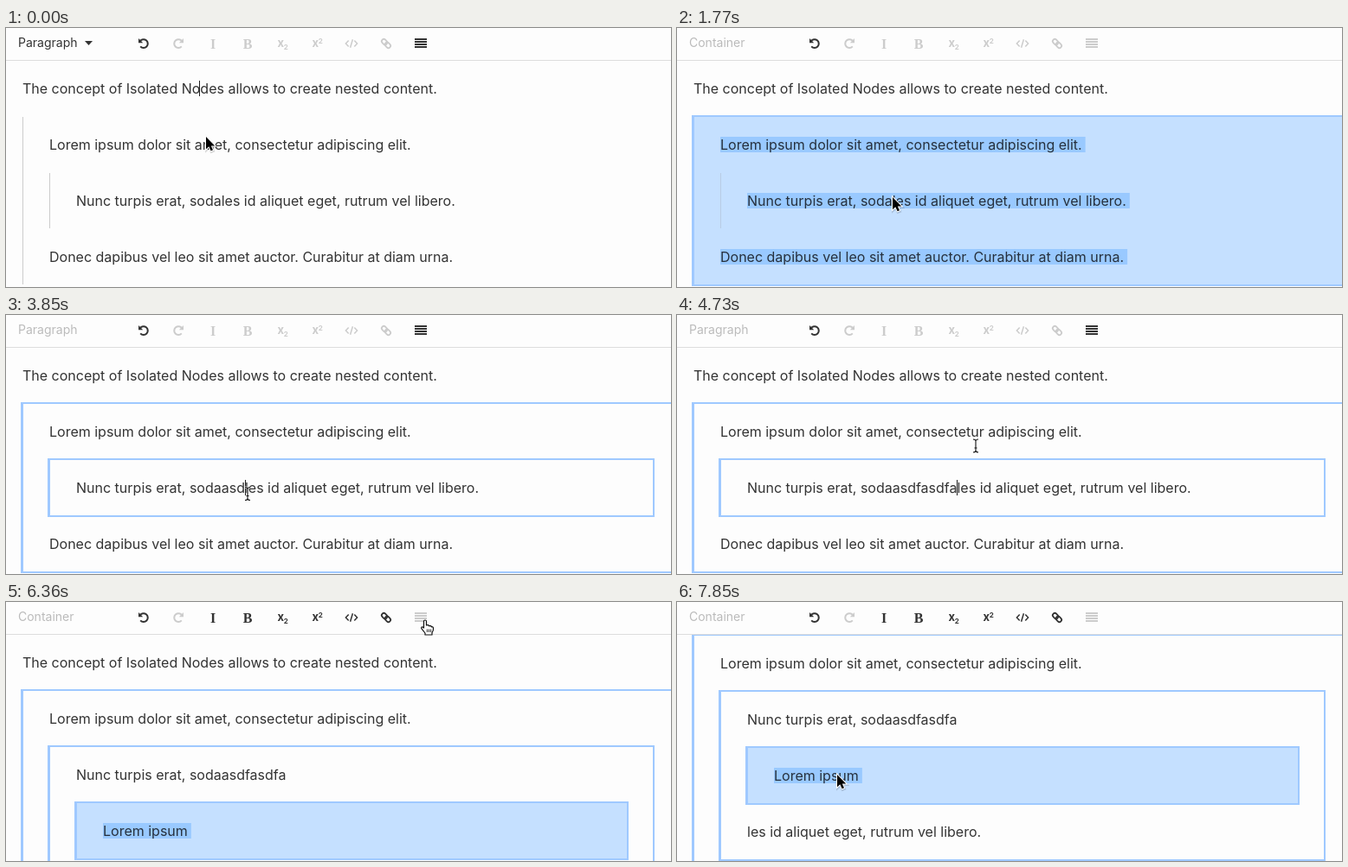
These frames come from a looping animation (768x300 px, 8000 ms). An HTML page:

```html
<!DOCTYPE html>
<html lang="en">
<head>
<meta charset="utf-8">
<title>Nested content editor</title>
<style>
  html, body { margin: 0; width: 100%; height: 100%; overflow: hidden; background: #fdfdfd; }
  svg { display: block; }
  text { font-family: Inter, sans-serif; white-space: pre; }
  .serif { font: bold 16px "Liberation Serif", serif; }
</style>
</head>
<body>
<svg id="stage" width="768" height="300" viewBox="0 0 768 300"></svg>
<script>
const LOOP = 8000, TICK = 148.1;
const INK = '#333', DIM = '#ccc', EDGE = '#9fc9ff', FILL = '#c5e0ff', MARK = '#99c9ff';
const stage = document.getElementById('stage');
const pen = document.createElement('canvas').getContext('2d');
pen.font = '16px Inter, sans-serif';
const widthOf = s => pen.measureText(s).width;

// Moments, in ticks
const PICK_OUTER = 2, PICK_INNER = 13, ENTER = 22, HOVER = 36, INSERT = 43;

// Pointer path: tick, x, y
const PATH = [
  [0, 231, 126], [3, 231, 126], [4, 236, 122], [5, 236, 124], [6, 236, 124],
  [12, 249, 196], [13, 249, 200], [14, 249, 200], [15, 255, 199], [16, 261, 199],
  [17, 250, 201], [18, 250, 201], [19, 248.5, 201], [21, 248.5, 201],
  [26, 279, 207], [29, 294, 201], [30, 300, 191], [31, 300, 191],
  [33, 390, 112], [35, 500, 26], [37, 484, 21], [44, 484, 21],
  [47, 307, 140], [49, 307, 140], [51, 197, 189], [52, 190, 195], [53, 185, 200]
];
const SCROLL = [[46, 0], [47, 4], [48, 28], [49, 50], [50, 62], [51, 64]];
const TYPED = [[23, 0], [26, 3], [29, 9]];

// Linear interpolation along keyed rows
function along(keys, n) {
  if (n <= keys[0][0]) return keys[0].slice(1);
  for (let i = 1; i < keys.length; i++) {
    const a = keys[i - 1], b = keys[i];
    if (n <= b[0]) {
      const k = (n - a[0]) / (b[0] - a[0]);
      return a.slice(1).map((v, j) => v + (b[j + 1] - v) * k);
    }
  }
  return keys[keys.length - 1].slice(1);
}

const rect = (x, y, w, h, fill) =>
  `<rect x="${x}" y="${y}" width="${w}" height="${h}" fill="${fill}"/>`;
const path = (d, attrs) => `<path d="${d}" ${attrs}/>`;
const at = (x, y, body) => `<g transform="translate(${x} ${y})">${body}</g>`;
const label = (x, y, s, size, fill, attrs = '') =>
  `<text x="${x}" y="${y}" font-size="${size}" fill="${fill}" ${attrs}>${s}</text>`;
const line = (d, c, w) => path(d, `fill="none" stroke="${c}" stroke-width="${w}"`);

// A line of text centred on y, optionally marked as selected
function para(x, y, s, marked) {
  const mark = marked ? rect(x, y - 9, widthOf(s) + 4, 18, MARK) : '';
  return mark + label(x, y + 6, s, 16, marked ? '#26303c' : INK);
}

const caret = (x, y) => rect(Math.round(x), y - 9, 1, 18, '#222');

// Isolated node at a nesting depth; state is idle, shaded, focus or selected
function node(depth, top, bottom, state) {
  const x = 17 + 31 * depth, w = 762 - 61 * depth, h = bottom - top;
  if (state === 'idle' || state === 'shaded')
    return rect(x + 2, top + 2, 1, h - 4, state === 'idle' ? '#ccc' : '#b8cce4');
  return rect(x, top, w, h, EDGE) +
    rect(x + 3, top + 2, w - 5, h - 4, state === 'selected' ? FILL : '#fdfdfd');
}

function content(n) {
  const first = 'Lorem ipsum dolor sit amet, consectetur adipiscing elit.';
  const last = 'Donec dapibus vel leo sit amet auctor. Curabitur at diam urna.';
  const head = 'Nunc turpis erat, soda' + 'asdfasdfa'.slice(0, Math.round(along(TYPED, n)[0]));
  const tail = 'les id aliquet eget, rutrum vel libero.';
  const split = n >= INSERT;
  const outerPicked = n >= PICK_OUTER && n < PICK_INNER;
  const innerPicked = n >= PICK_INNER && n < ENTER;
  const grow = split ? 130 : 0;

  let out = para(19, 70, 'The concept of Isolated Nodes allows to create nested content.');
  if (n < PICK_OUTER) out += caret(223, 70);
  out += node(0, 101, 299 + grow, n < PICK_OUTER ? 'idle' : outerPicked ? 'selected' : 'focus');
  out += para(50, 135, first, outerPicked);
  out += node(1, 166, 234 + grow,
    n < PICK_OUTER ? 'idle' : outerPicked ? 'shaded' : innerPicked ? 'selected' : 'focus');
  if (split) {
    out += para(81, 200, head) + node(2, 231, 299, 'selected') +
      para(112, 265, 'Lorem ipsum', true) + para(81, 330, tail);
  } else {
    out += para(81, 200, head + tail, outerPicked || innerPicked);
    const lit = n < 33 || (n > 35 && n < 39);
    if (n >= ENTER && lit) out += caret(81 + widthOf(head), 200);
  }
  return out + para(50, 265 + grow, last, outerPicked);
}

const turn = c => line('M-4.2 -2.6A4.9 4.9 0 1 1 -3.8 3.4', c, 2) +
  path('M-6 -6V-.8H-.8Z', `fill="${c}"`);
const script = (c, y) => label(-5.5, 4, 'x', 13, c, 'font-weight="700"') +
  label(1.8, y, '2', 8, c, 'font-weight="700"');
const glyph = (s, c, style) =>
  `<text class="serif" y="5.5" text-anchor="middle" fill="${c}" font-style="${style}">${s}</text>`;
const loopLink = (x, c) =>
  `<rect x="${x}" y="-2.5" width="7" height="5" rx="2.5" fill="none" stroke="${c}" stroke-width="1.8"/>`;

const ICONS = [
  turn,
  c => `<g transform="scale(-1 1)">${turn(c)}</g>`,
  c => glyph('I', c, 'italic'),
  c => glyph('B', c, 'normal'),
  c => script(c, 7),
  c => script(c, -.5),
  c => line('M-3.3 -3.5L-6.6 0L-3.3 3.5M3.3 -3.5L6.6 0L3.3 3.5M1.4 -4.8L-1.4 4.8', c, 1.5),
  c => `<g transform="rotate(45)">${loopLink(-6.2, c)}${loopLink(-.8, c)}</g>`,
  c => [-6, -3, 0, 3].map(y => rect(-7, y, 14, 2, c)).join('')
];

function toolbar(n) {
  const inText = n < PICK_OUTER || (n >= ENTER && n < INSERT);
  const marks = n >= INSERT;
  let out = rect(0, 0, 768, 37, '#fdfdfd') + rect(0, 37, 768, 1, '#ddd');
  if (n >= HOVER && n < INSERT) out += rect(464, 2, 30, 30, '#e1e4e4');
  out += label(14, 22, inText ? 'Paragraph' : 'Container', 14, n < PICK_OUTER ? INK : '#bbb');
  if (n < PICK_OUTER) out += path('M91 15H100L95.5 20Z', `fill="${INK}"`);
  ICONS.forEach((icon, i) => {
    const on = i === 0 || (i === 8 ? inText : i > 1 && marks);
    out += at(159 + 40 * i, 18, icon(on ? INK : DIM));
  });
  return out;
}

const ARROW = 'M0 0V14.2L3.3 11.2L5.6 16.2L8 15.2L5.8 10.4H10.2Z';
const BEAM = 'M-3 -7.5Q0 -7.5 0 -5.5Q0 -7.5 3 -7.5M0 -5.5V5.5M-3 7.5Q0 7.5 0 5.5Q0 7.5 3 7.5M-1.5 2.5H1.5';
const HAND = 'M-1.5 9V1.2Q-1.5 0 0 0T1.5 1.2V6Q4 5 4.5 6.8Q7 6 7.2 7.8Q9.5 7.2 9.5 9.5' +
  'Q9.8 12.5 8 14.5V17H0V15L-4.2 9.6Q-4.6 7.6 -2.8 8Z';

function pointer(n) {
  const [x, y] = along(PATH, n);
  let body;
  if (n >= HOVER && n <= 44) {
    body = path(HAND, 'fill="#fff" stroke="#111" stroke-width="1.2" stroke-linejoin="round"') +
      line('M2.4 10.5V14M4.5 10.5V14M6.6 10.5V14', '#111', .9);
  } else if (n >= PICK_INNER && n < 34) {
    body = line(BEAM, 'rgba(255,255,255,.7)', 2.6) + line(BEAM, '#111', 1.1);
  } else {
    body = `<g transform="translate(.5 1.2)">${path(ARROW, 'fill="#000" stroke="#000" stroke-width="3" opacity=".14"')}</g>` +
      path(ARROW, 'fill="#000" stroke="#fff" stroke-width="2" paint-order="stroke"');
  }
  return at(x, y, body);
}

let shown = -1;
function frame() {
  const n = Math.min(53, Math.floor((performance.now() % LOOP + 14) / TICK));
  if (n !== shown) {
    shown = n;
    stage.innerHTML = rect(0, 0, 768, 300, '#fdfdfd') +
      at(0, -along(SCROLL, n)[0], content(n)) + toolbar(n) + pointer(n);
  }
  requestAnimationFrame(frame);
}
frame();
</script>
</body>
</html>
```
